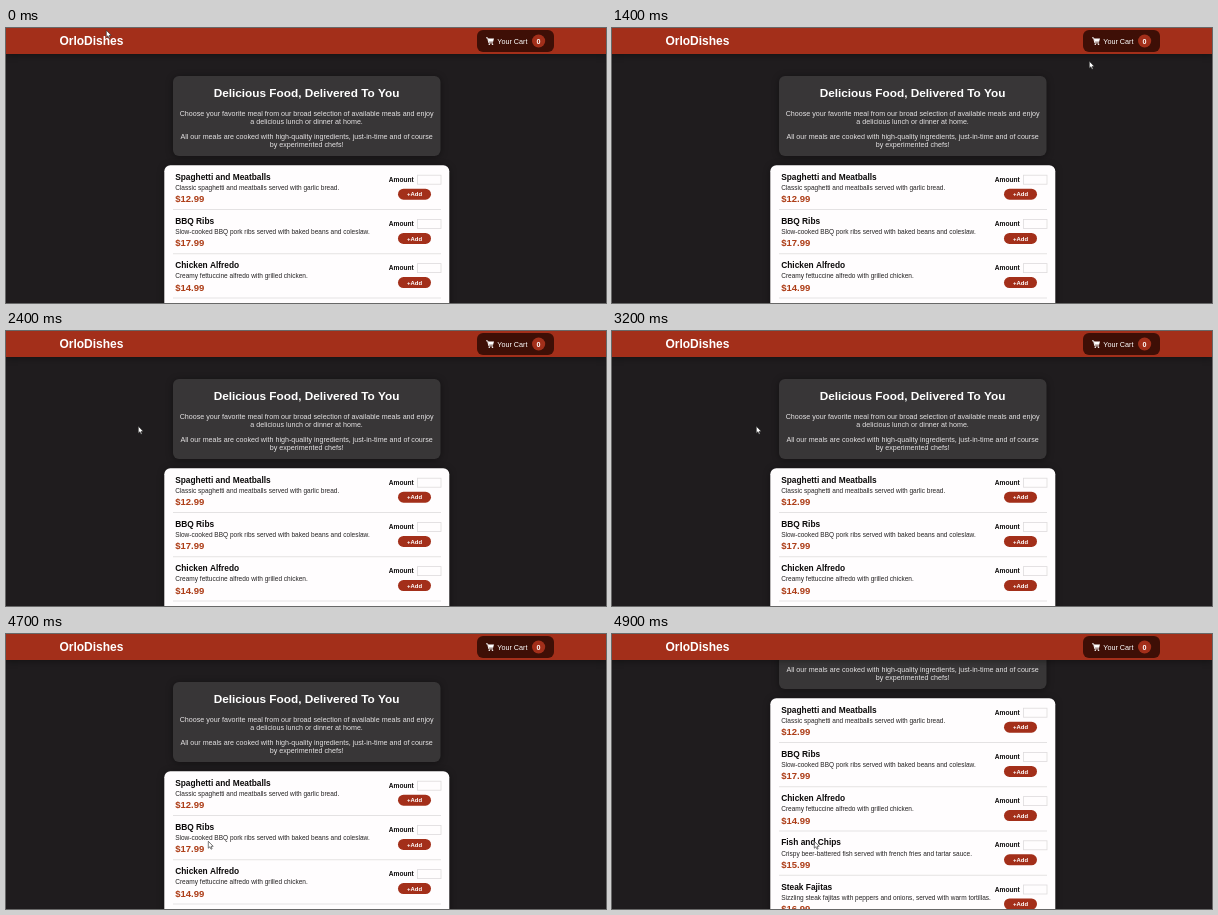
Animation of 600x275 px, one loop 5 s. Source, as an HTML page with a canvas:

```html
<!DOCTYPE html>
<html lang="en">
<head>
<meta charset="utf-8">
<title>Meal ordering page</title>
<style>
  html, body { margin: 0; width: 100%; height: 100%; overflow: hidden; background: #1f1c1e; }
  canvas { display: block; width: 600px; height: 275px; }
</style>
</head>
<body>
<canvas id="stage"></canvas>
<script>
const W = 600, H = 275, LOOP = 5000, STEP = 100;
const RED = '#a32f1a', FONT = '"Liberation Sans", Arial, sans-serif';
const canvas = document.getElementById('stage');
const ratio = window.devicePixelRatio || 1;
canvas.width = W * ratio;
canvas.height = H * ratio;
const ctx = canvas.getContext('2d');
ctx.scale(ratio, ratio);

const meals = [
  ['Spaghetti and Meatballs', 'Classic spaghetti and meatballs served with garlic bread.', '$12.99'],
  ['BBQ Ribs', 'Slow-cooked BBQ pork ribs served with baked beans and coleslaw.', '$17.99'],
  ['Chicken Alfredo', 'Creamy fettuccine alfredo with grilled chicken.', '$14.99'],
  ['Fish and Chips', 'Crispy beer-battered fish served with french fries and tartar sauce.', '$15.99'],
  ['Steak Fajitas', 'Sizzling steak fajitas with peppers and onions, served with warm tortillas.', '$16.99']
];

// Pointer path: time, x, y
const path = [
  [0, 100, 2], [600, 420, 32], [1000, 538, 9], [1400, 477, 33],
  [1900, 210, 88], [2200, 126, 98], [2400, 132, 95], [2600, 144, 95],
  [3400, 144, 95], [4000, 176, 150], [4600, 202, 207], [LOOP, 202, 207]
];

function text(str, x, y, size, color, bold, align) {
  ctx.font = (bold ? 'bold ' : '') + size + 'px ' + FONT;
  ctx.fillStyle = color;
  ctx.textAlign = align || 'left';
  ctx.fillText(str, x, y);
}

function box(x, y, w, h, r, color) {
  ctx.beginPath();
  ctx.roundRect(x, y, w, h, r);
  ctx.fillStyle = color;
  ctx.fill();
}

function shadowBox(...args) {
  ctx.save();
  ctx.shadowColor = 'rgba(0,0,0,.4)';
  ctx.shadowBlur = 7 * ratio;
  ctx.shadowOffsetY = ratio;
  box(...args);
  ctx.restore();
}

function summary() {
  shadowBox(167, 48, 267.5, 80, 6, '#383637');
  text('Delicious Food, Delivered To You', 300.5, 69, 11.8, '#fff', true, 'center');
  const lines = [
    ['Choose your favorite meal from our broad selection of available meals and enjoy', 88.2],
    ['a delicious lunch or dinner at home.', 96.2],
    ['All our meals are cooked with high-quality ingredients, just-in-time and of course', 111.2],
    ['by experimented chefs!', 119.2]
  ];
  for (const [line, y] of lines) text(line, 300.6, y, 7.13, '#e4e2e3', false, 'center');
}

function meal([name, info, price], y) {
  text(name, 169.2, y + 14.6, 8.36, '#0c0a0a', true);
  text(info, 169.2, y + 24.7, 6.52, '#252323');
  text(price, 169.2, y + 37, 9.5, '#ad3d17', true);
  text('Amount', 382.8, y + 16.5, 6.6, '#0c0a0a', true);
  ctx.strokeStyle = '#dedbdd';
  ctx.lineWidth = .8;
  ctx.strokeRect(411.5, y + 10, 23.5, 9);
  box(392, y + 23.5, 33, 11, 5.5, RED);
  text('+Add', 408.5, y + 31.1, 5.95, '#fff', true, 'center');
  ctx.fillStyle = '#dedcdd';
  ctx.fillRect(167, y + 44, 268, .8);
}

function cartIcon() {
  ctx.strokeStyle = '#fff';
  ctx.lineWidth = .9;
  ctx.beginPath();
  ctx.moveTo(480, 9.8);
  ctx.lineTo(481.6, 9.8);
  ctx.lineTo(482.8, 14.9);
  ctx.lineTo(487, 14.9);
  ctx.stroke();
  ctx.fillStyle = '#fff';
  ctx.beginPath();
  ctx.moveTo(481.8, 10.5);
  ctx.lineTo(488, 10.5);
  ctx.lineTo(487.1, 13.8);
  ctx.lineTo(482.6, 13.8);
  ctx.fill();
  for (const x of [483.3, 486.5]) {
    ctx.beginPath();
    ctx.arc(x, 16.3, .8, 0, 7);
    ctx.fill();
  }
}

function header() {
  shadowBox(0, 0, W, 26, 0, RED);
  text('OrloDishes', 53.4, 17.2, 12, '#fff', true);
  box(471, 2, 77, 22, 6, '#3e0f06');
  cartIcon();
  text('Your Cart', 491.3, 15.5, 7.2, '#fff');
  box(526, 6.5, 13.2, 13, 6.5, RED);
  text('0', 532.6, 15.6, 7.2, '#fff', true, 'center');
}

function pointer(t) {
  let i = 0;
  while (i < path.length - 2 && t >= path[i + 1][0]) i++;
  const [t0, x0, y0] = path[i], [t1, x1, y1] = path[i + 1];
  const k = (t - t0) / (t1 - t0), e = k * k * (3 - 2 * k);
  ctx.save();
  ctx.translate(x0 + (x1 - x0) * e, y0 + (y1 - y0) * e);
  ctx.beginPath();
  ctx.moveTo(.3, .3);
  for (const [x, y] of [[.3, 7.2], [1.9, 5.8], [3, 8.2], [4.1, 7.7], [3.1, 5.4], [5.2, 5.3]]) ctx.lineTo(x, y);
  ctx.closePath();
  ctx.fillStyle = '#fff';
  ctx.fill();
  ctx.strokeStyle = '#222';
  ctx.lineWidth = .6;
  ctx.stroke();
  ctx.restore();
}

function draw(now) {
  const t = Math.floor((now % LOOP) / STEP) * STEP;
  const scroll = t >= 4900 ? 73 : t >= 4800 ? 35.3 : 0;
  ctx.fillStyle = '#1f1c1e';
  ctx.fillRect(0, 0, W, H);
  ctx.save();
  ctx.translate(0, -scroll);
  summary();
  shadowBox(158.3, 137.2, 285, 260, 6, '#fffdfe');
  meals.forEach((m, i) => meal(m, 137.2 + i * 44.2));
  ctx.restore();
  header();
  pointer(t);
}

const start = performance.now();
function tick() {
  draw(performance.now() - start);
  requestAnimationFrame(tick);
}
tick();
</script>
</body>
</html>
```
